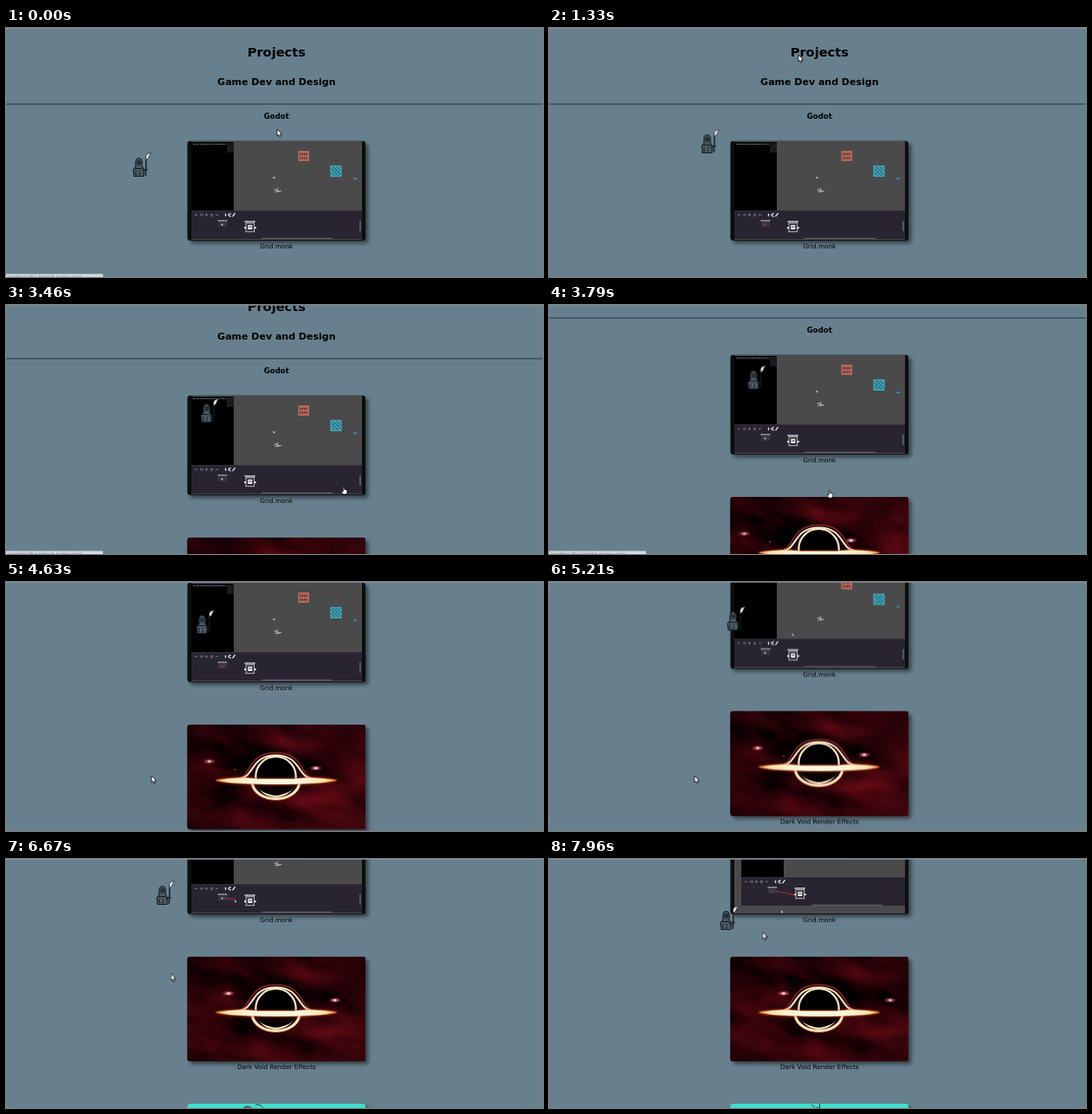
These frames come from a looping animation (620x288 px, 8000 ms). An HTML page:

```html
<!DOCTYPE html>
<html lang="en">
<head>
<meta charset="utf-8">
<title>Projects</title>
<style>
  html, body { margin: 0; width: 100%; height: 100%; overflow: hidden; background: #68808e; }
  svg { display: block; width: 620px; height: 288px; }
  text { font-family: "DejaVu Sans", sans-serif; font-size: 7.3px; text-anchor: middle; }
  .bold { font-weight: bold; }
  .anim { animation: 8s linear infinite; }

  #page { animation-name: scroll; }
  @keyframes scroll {
    0%, 29.5% { transform: translateY(0); }
    31.25% { transform: translateY(-9px); }
    33%, 43.75% { transform: translateY(-26px); }
    46.5% { transform: translateY(-62px); }
    51.5% { transform: translateY(-124px); }
    53%, 63.5% { transform: translateY(-130px); }
    69%, 100% { transform: translateY(-182px); }
  }

  #reaper { animation-name: chase; }
  @keyframes chase {
    0% { transform: translate(155px, 160px); }
    11% { transform: translate(174px, 142px); }
    20.9% { transform: translate(192px, 126px); }
    31.25% { transform: translate(211px, 131px); }
    43.25% { transform: translate(233px, 150px); }
    49.5% { transform: translate(240px, 163px); }
    57.9% { transform: translate(228px, 178px); }
    70.4% { transform: translate(204px, 198px); }
    83.4% { transform: translate(182px, 223px); }
    99.5%, 100% { transform: translate(206px, 252px); }
  }

  #pointer { animation-name: point; }
  @keyframes point {
    0% { transform: translate(313px, 117px); }
    6%, 23% { transform: translate(288px, 31px); }
    29%, 31.25% { transform: translate(297.5px, 135.5px); }
    37% { transform: translate(356px, 178px); }
    42%, 45% { transform: translate(390px, 210px); }
    53%, 70.5% { transform: translate(168px, 224px); }
    73.5% { transform: translate(169px, 220px); }
    82%, 85% { transform: translate(190.5px, 132.5px); }
    97%, 100% { transform: translate(246.5px, 84.5px); }
  }
  #arrow { animation-name: arrow; }
  @keyframes arrow {
    0%, 31.6% { opacity: 1; }
    31.61%, 50% { opacity: 0; }
    50.01%, 100% { opacity: 1; }
  }
  #hand { animation-name: hand; }
  @keyframes hand {
    0%, 31.6% { opacity: 0; }
    31.61%, 50% { opacity: 1; }
    50.01%, 100% { opacity: 0; }
  }
  #status { animation-name: status; }
  @keyframes status {
    0%, 3% { opacity: 1; }
    5%, 30.6% { opacity: 0; }
    31.25% { opacity: .15; }
    33%, 53% { opacity: 1; }
    55%, 100% { opacity: 0; }
  }

  #editor { animation-name: pan; }
  @keyframes pan {
    0%, 94.5% { transform: translate(0, 0); }
    98.5%, 100% { transform: translate(8px, -8px); }
  }
  #spot { animation-name: spot; }
  @keyframes spot {
    0%, 59% { transform: translate(308.5px, 172px); }
    68%, 71% { transform: translate(267.5px, 221px); }
    76% { transform: translate(252px, 228px); }
    83.4% { transform: translate(264px, 230px); }
    91%, 94.5% { transform: translate(276px, 232px); }
    98.5%, 100% { transform: translate(268px, 242px); }
  }
  #wire { stroke-dasharray: 23; animation-name: wire; }
  @keyframes wire {
    0%, 76% { stroke-dashoffset: 23; }
    83.4% { stroke-dashoffset: 11; }
    91%, 100% { stroke-dashoffset: 0; }
  }
  #pin { animation-name: blink; animation-duration: 1.6s; }
  @keyframes blink {
    0%, 45% { fill: #d8d4d8; }
    46%, 100% { fill: #c03848; }
  }
  #sky { animation-name: drift; }
  @keyframes drift {
    from { transform: translateX(-50px); }
    to { transform: translateX(37px); }
  }
  #dome { animation-name: dome; }
  @keyframes dome {
    0%, 90% { opacity: 1; }
    90.01%, 100% { opacity: 0; }
  }
  #blade { animation-name: blade; }
  @keyframes blade {
    0%, 90% { opacity: 0; }
    90.01%, 100% { opacity: 1; }
  }
</style>
</head>
<body>
<svg viewBox="0 0 620 288">
  <defs>
    <filter id="shadow" x="-10%" y="-10%" width="120%" height="125%">
      <feDropShadow dx="3.3" dy="3.3" stdDeviation="1.9" flood-color="#000" flood-opacity=".5"/>
    </filter>
    <filter id="nebula" x="0" y="0" width="100%" height="100%" color-interpolation-filters="sRGB">
      <feTurbulence type="fractalNoise" baseFrequency=".009 .022" numOctaves="5" seed="8"/>
      <feColorMatrix values=".8 0 0 0 -.17  .1 0 0 0 -.032  .17 0 0 0 -.04  0 0 0 0 1"/>
    </filter>
    <filter id="soft" x="-10%" y="-40%" width="120%" height="180%"><feGaussianBlur stdDeviation="1"/></filter>
    <clipPath id="view"><rect x="214" y="131" width="197" height="114"/></clipPath>
    <clipPath id="frame"><rect x="209.5" y="295" width="205.5" height="121" rx="3"/></clipPath>
    <radialGradient id="vignette">
      <stop offset=".5" stop-color="#0a0003" stop-opacity="0"/>
      <stop offset="1" stop-color="#0a0003" stop-opacity=".5"/>
    </radialGradient>
    <radialGradient id="flare">
      <stop offset="0" stop-color="#fff0f0"/>
      <stop offset=".3" stop-color="#ff8a94" stop-opacity=".75"/>
      <stop offset="1" stop-color="#c02038" stop-opacity="0"/>
    </radialGradient>
    <linearGradient id="disc">
      <stop offset="0" stop-color="#f08c3c"/>
      <stop offset=".1" stop-color="#ffe2ac"/>
      <stop offset=".3" stop-color="#fff6dc"/>
      <stop offset=".7" stop-color="#fff6dc"/>
      <stop offset=".9" stop-color="#ffe2ac"/>
      <stop offset="1" stop-color="#f08c3c"/>
    </linearGradient>
    <pattern id="hatch" width="3" height="3" patternUnits="userSpaceOnUse" patternTransform="rotate(-45)">
      <rect width="3" height="3" fill="#46a9bd"/>
      <rect width="1.2" height="3" fill="#235f70"/>
    </pattern>
    <g id="star">
      <ellipse rx="8" ry="3.5" fill="url(#flare)"/>
      <circle r="1.2" fill="#fff"/>
    </g>
  </defs>

  <rect width="620" height="288" fill="#68808e"/>

  <g id="page" class="anim">
    <text class="bold" x="312.3" y="32.5" style="font-size:14.6px">Projects</text>
    <text class="bold" x="312.3" y="66.2" style="font-size:11px">Game Dev and Design</text>
    <path d="M0 88H619.5" stroke="#25343e"/>
    <text class="bold" x="312.3" y="105.3" style="font-size:8.55px">Godot</text>

    <rect x="209.5" y="130.7" width="205.5" height="115" rx="3" fill="#08080a" filter="url(#shadow)"/>
    <g clip-path="url(#view)">
      <rect x="214" y="131" width="197" height="114" fill="#4b4a4b"/>
      <g id="editor" class="anim">
        <rect x="214" y="132" width="49" height="79"/>
        <path d="M216 134.3H254" stroke="#55686c" stroke-width="1.2" stroke-dasharray="2 .6"/>
        <rect x="255" y="133" width="8" height="11" fill="#1b1b1d"/>
        <rect x="214" y="211.3" width="220" height="32.7" fill="#292431"/>
        <g fill="none" stroke="#88838d" stroke-width=".9">
          <path d="M218 216.2h3M225 214.7v3M227 214.7v3M230 216.2h3M231.5 214.7v3M236 215.7h3M236 217.2h3M242 216.2h3"/>
          <path d="M253.5 214.7v3M256.5 216.2l3-2M256.5 216.2l3 2M261.5 218.2l3-4" stroke="#f2f0f2" stroke-width="1.3"/>
        </g>
        <path d="M295 243.3H377" stroke="#77717c" stroke-width=".9"/>
        <rect x="408" y="223" width="1.8" height="12" fill="#5f5a66"/>
        <g>
          <rect x="245" y="222" width="10" height="8" fill="#3a3541"/>
          <path d="M244.5 222.8h11" stroke="#aaa5ac" stroke-width="1.5" stroke-dasharray="1.6 .4"/>
          <circle id="pin" class="anim" cx="249.5" cy="227.5" r="1"/>
          <path d="M275.5 223.8h12.5" stroke="#d2ced4" stroke-width="1.8" stroke-dasharray="2 .4"/>
          <rect x="277" y="225.7" width="9.6" height="10" fill="#2d2933" stroke="#bdb9c0" stroke-width="1"/>
          <rect x="279.3" y="227.8" width="5" height="5.2" fill="#eeecef"/>
          <path d="M280.5 230h2.8" stroke="#29242f"/>
          <path d="M275 231.2h2M286.8 231.2h2" stroke="#fff" stroke-width="1.7"/>
        </g>
        <path id="wire" class="anim" d="M254 227.5Q262 228 276 232" fill="none" stroke="#b43544" stroke-width="1.1"/>
        <rect x="337.5" y="142" width="12.5" height="12" fill="#b4695b"/>
        <path d="M339 146h9M339 150.5h9" stroke="#693a36" stroke-width="2.4" stroke-dasharray="1.8 .7"/>
        <rect x="375" y="159.5" width="12" height="12" fill="url(#hatch)" stroke="#46adc2"/>
        <path d="M401.5 173l5 1.2-5 1.3z" fill="#3e93c4"/>
        <path d="M309.5 187.2h3l1-1.2v2.5h4.5M310.5 189.4h5" fill="none" stroke="#a9a7a9" stroke-width="1.2"/>
      </g>
      <path id="spot" class="anim" d="M0 0l2 1.3-1.2.9z" fill="#fff" stroke="#fff" stroke-width=".3"/>
    </g>
    <text x="312.3" y="254.7">Grid.monk</text>

    <rect x="209.5" y="295" width="205.5" height="121" rx="3" fill="#22040a" filter="url(#shadow)"/>
    <g clip-path="url(#frame)">
      <g id="sky" class="anim">
        <rect x="80" y="210" width="480" height="290" transform="rotate(16 312 355)" filter="url(#nebula)"/>
        <use href="#star" x="234.3" y="337.5"/>
        <use href="#star" x="357.3" y="345.3"/>
        <circle cx="264" cy="347" r=".7" fill="#e47a88"/>
      </g>
      <rect x="180" y="275" width="264" height="162" fill="url(#vignette)"/>
      <g fill="none">
        <path d="M266 357.5C285 356 277 327.5 311.5 327.5S338 356 357 357.5" fill="#1b0307" stroke="#86242a" stroke-width="1.6"/>
        <path d="M269 357.5C287 356 282 330.5 311.5 330.5S336 356 354 357.5" stroke="#ffe9c0" stroke-width="2"/>
        <path d="M284 362C288 387 335 387 339 362" fill="#120306" stroke="#d9642a" stroke-width="3.8"/>
        <path d="M284 362C288 387 335 387 339 362" stroke="#fff2d2" stroke-width="2.4"/>
        <ellipse cx="311.5" cy="355" rx="23.2" ry="23" fill="#000" stroke="#fff1cf" stroke-width="2.2"/>
        <path d="M288 362h47c-4 19-43 19-47 0z" fill="#0a0203"/>
      </g>
      <path id="plane" d="M242 359.3C262 355.5 280 356 290 357.8H333C343 356 361 355.5 382 359.3C364 365.8 259 365.8 242 359.3z" fill="#d4551f" stroke="#d4551f" filter="url(#soft)"/>
      <path d="M242 359.3C262 355.5 280 356 290 357.8H333C343 356 361 355.5 382 359.3C364 365.6 259 365.6 242 359.3z" fill="url(#disc)"/>
    </g>
    <text x="312.3" y="424.8">Dark Void Render Effects</text>

    <rect x="209.5" y="465" width="205.5" height="121" rx="3" fill="#43decb" filter="url(#shadow)"/>
    <g fill="none" stroke="#263f45">
      <g id="dome" class="anim">
        <path d="M273 472Q275 468 279 468T285 472" fill="#657f85"/>
        <path d="M288 466Q295 465 298 472"/>
      </g>
      <path id="blade" class="anim" d="M303 466L309 472M312.5 465V472M306 472Q310 468 313 470"/>
    </g>

    <g id="reaper" class="anim" stroke="#14191d" stroke-linejoin="round" fill="none">
      <path d="M7-12L6.3 11" stroke-width="1.4"/>
      <path d="M-7 11.5L-8 4-5 0C-6-6-4.5-9.5-1.5-9.5S3-6 2 0L4.5 4 3.8 11.5z" fill="#4b5a64" stroke-width="1.1"/>
      <ellipse cx="-1.4" cy="-4.2" rx="2" ry="2.6" fill="#2c373f" stroke-width=".8"/>
      <path d="M-6 2.5H2M-5 5V10.5M-1 5V10.5M2 4.5L9 3.5" stroke-width="1"/>
      <path d="M-4 7h2.5" stroke="#74838c" stroke-width=".9"/>
      <path d="M6.3-7.5L6.8-12.5Q8.5-15.5 12.5-15.3 10-13 9.4-9.5z" fill="#f4f4ef" stroke-width=".7"/>
    </g>
  </g>

  <path d="M0 .4H620" stroke="#83949f" stroke-width=".8"/>

  <g id="status" class="anim">
    <rect y="284.5" width="112" height="4" fill="#d5dadd"/>
    <text x="2" y="289.5" fill="#777f85" style="font-size:6px;text-anchor:start">loading the linked page view</text>
  </g>

  <g id="pointer" class="anim" stroke="#000" stroke-width=".8" stroke-linejoin="round">
    <path id="arrow" class="anim" d="M0 0V8L1.8 6.4 3 9.2 4.4 8.6 3.2 5.9H5.6z" fill="#fff"/>
    <path id="hand" class="anim" d="M-.8.5Q0-.4.8.5V3.2L4 4V7L3 9H-1L-3 5.5-2.2 4.8-.8 6z" fill="#fff"/>
  </g>
</svg>
</body>
</html>
```
